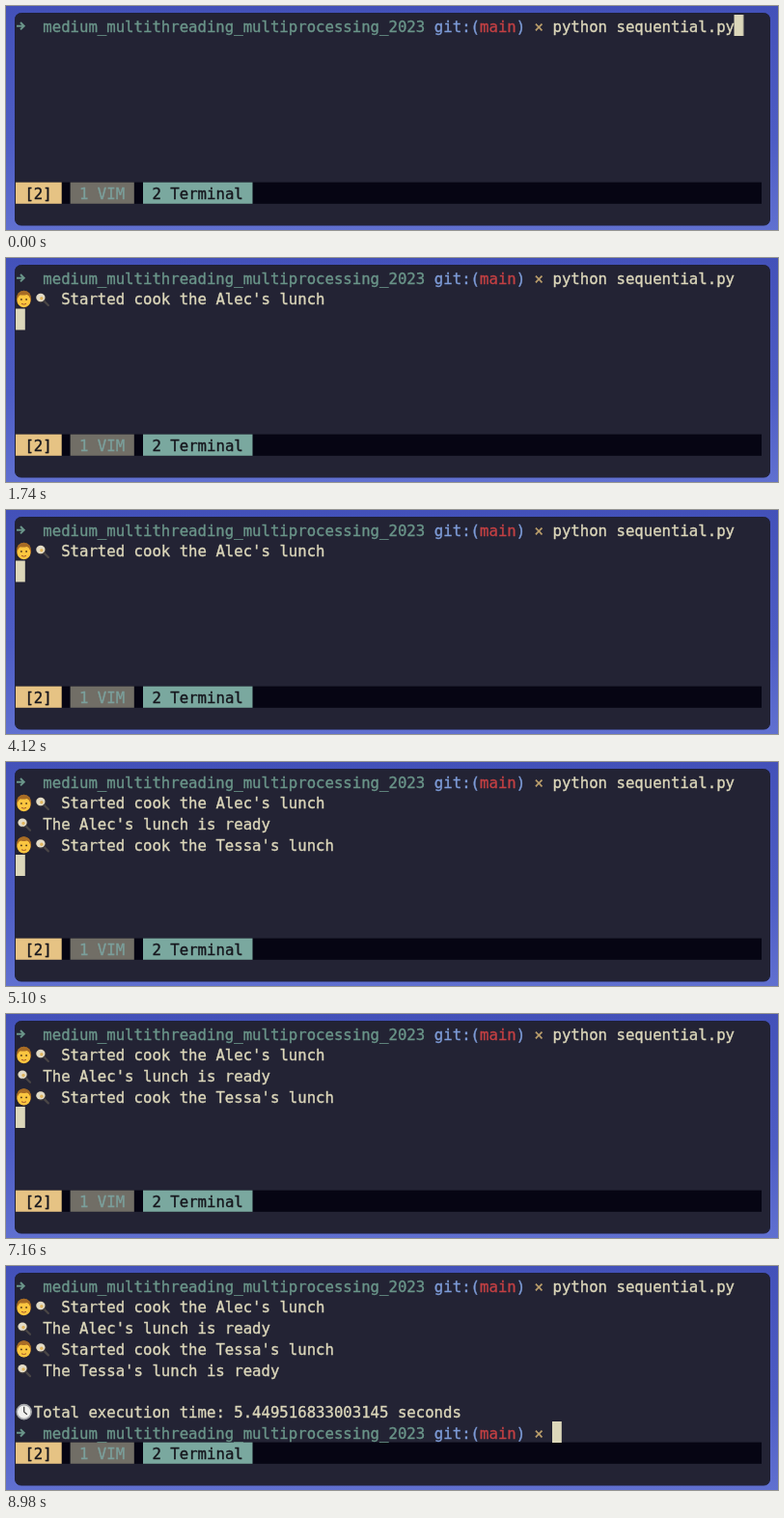
Animation, 800 px wide and 232 px high, one loop 9 s. Source, as an HTML page:

```html
<!DOCTYPE html>
<html lang="en">
<head>
<meta charset="utf-8">
<title>Sequential run in a terminal</title>
<style>
  html, body { margin: 0; width: 100%; height: 100%; overflow: hidden; background: #4553b8; }
  svg { display: block; width: 800px; height: 232px; }
  text {
    font: 15.67px "DejaVu Sans Mono", "Noto Sans Mono", monospace;
    font-variant-ligatures: none;
    white-space: pre;
    color: #dcd7ba;
    fill: currentColor;
    stroke: currentColor;
    stroke-width: .35px;
  }
  .path { color: #6a9589; }
  .git { color: #7e9cd8; }
  .branch { color: #c34043; }
  .dirty { color: #c0a36e; }
  .dark { color: #16161d; }
  .dim { color: #7b9f9b; }

  .stage { animation: 9s step-end infinite; }
  #first { animation-name: first; }
  #second { animation-name: second; }
  #finish { animation-name: finish; }
  #cursor { animation-name: cursor; }

  @keyframes first { 0% { visibility: hidden; } 8.45%, 100% { visibility: visible; } }
  @keyframes second { 0% { visibility: hidden; } 52.9%, 100% { visibility: visible; } }
  @keyframes finish { 0% { visibility: hidden; } 95.2%, 100% { visibility: visible; } }
  @keyframes cursor {
    0% { transform: translate(754.5px, 9px); }
    5.2% { transform: translate(10px, 31px); }
    8.45% { transform: translate(10px, 52.5px); }
    52.9% { transform: translate(10px, 96px); }
    95.2%, 100% { transform: translate(566px, 161px); }
  }
</style>
</head>
<body>
<svg viewBox="0 0 800 232">
  <defs>
    <linearGradient id="sky" x1="0" y1="0" x2="0" y2="1">
      <stop offset="0" stop-color="#4351b9"/>
      <stop offset=".6" stop-color="#4e5dc4"/>
      <stop offset="1" stop-color="#6070d0"/>
    </linearGradient>
    <g id="arrow" fill="none" stroke="#6a9589" stroke-width="2">
      <path d="M1 11.5H8M5 7.8L8.7 11.5L5 15.2"/>
    </g>
    <g id="man">
      <ellipse cx="8.5" cy="11.4" rx="7.6" ry="8.6" fill="#a86c25"/>
      <ellipse cx="8.5" cy="13" rx="6.9" ry="7.2" fill="#fbc640"/>
      <path d="M1.4 12Q.8 3 8.5 2.8Q16.2 3 15.6 12Q14.2 7.6 11.5 7Q8 8 4.6 7.2Q2.6 8.4 1.4 12Z" fill="#a86c25"/>
      <circle cx="5.9" cy="12" r=".9" fill="#4b3218"/>
      <circle cx="11.1" cy="12" r=".9" fill="#4b3218"/>
      <path d="M6 16.4Q8.5 18 11 16.4" fill="none" stroke="#a4552a"/>
    </g>
    <g id="pan">
      <path d="M10 13L15 18" stroke="#4a4646" stroke-width="2.2" stroke-linecap="round"/>
      <circle cx="7.4" cy="10.6" r="5" fill="#3b3739"/>
      <ellipse cx="7" cy="10" rx="4.6" ry="4.2" fill="#e3dcc8"/>
      <circle cx="8" cy="10.8" r="1.7" fill="#dfb45e"/>
    </g>
    <g id="clock">
      <circle cx="8.7" cy="11.5" r="7.5" fill="#f0f0ee" stroke="#a3a5a9" stroke-width="1.6"/>
      <path d="M8.7 6.2V11.5L11.8 14.2" fill="none" stroke="#333" stroke-width="1.2"/>
    </g>
  </defs>

  <rect width="800" height="232" fill="url(#sky)"/>
  <rect x="9.5" y="7.5" width="782" height="219.5" rx="6" fill="#232334" stroke="#1f2038"/>

  <rect x="10" y="182.6" width="773" height="22.2" fill="#060513"/>
  <rect x="10" y="182.6" width="47.7" height="22.2" fill="#e6c384"/>
  <rect x="66.6" y="182.6" width="66.2" height="22.2" fill="#716e66"/>
  <rect x="142" y="182.6" width="113.5" height="22.2" fill="#7aa89f"/>

  <rect id="cursor" class="stage" width="9.8" height="22" fill="#dcd7ba"/>
  <g id="base"></g>
  <g id="first" class="stage"></g>
  <g id="second" class="stage"></g>
  <g id="finish" class="stage"></g>
</svg>
<script>
  const NS = "http://www.w3.org/2000/svg";
  const colX = col => 10 + col * 9.432;
  const rowY = row => 9.2 + row * 21.73;

  function add(group, tag, attrs, label = "") {
    const node = document.createElementNS(NS, tag);
    for (const key in attrs) node.setAttribute(key, attrs[key]);
    node.textContent = label;
    document.getElementById(group).append(node);
  }

  const write = (group, row, col, label, style = "") =>
    add(group, "text", { x: colX(col), y: rowY(row) + 17.4, class: style }, label);

  const icon = (group, row, col, name) =>
    add(group, "use", { href: "#" + name, x: colX(col), y: rowY(row) });

  function prompt(group, row) {
    icon(group, row, 0, "arrow");
    write(group, row, 3, "medium_multithreading_multiprocessing_2023", "path");
    write(group, row, 46, "git:(", "git");
    write(group, row, 51, "main", "branch");
    write(group, row, 55, ")", "git");
    write(group, row, 57, "×", "dirty");
  }

  function started(group, row, name) {
    icon(group, row, 0, "man");
    icon(group, row, 2, "pan");
    write(group, row, 5, `Started cook the ${name}'s lunch`);
  }

  function ready(group, row, name) {
    icon(group, row, 0, "pan");
    write(group, row, 3, `The ${name}'s lunch is ready`);
  }

  prompt("base", 0);
  write("base", 0, 59, "python sequential.py");
  write("base", 8, 1, "[2]", "dark");
  write("base", 8, 7, "1 VIM", "dim");
  write("base", 8, 15, "2 Terminal", "dark");

  started("first", 1, "Alec");
  ready("second", 2, "Alec");
  started("second", 3, "Tessa");
  ready("finish", 4, "Tessa");
  icon("finish", 6, 0, "clock");
  write("finish", 6, 2, "Total execution time: 5.449516833003145 seconds");
  prompt("finish", 7);
</script>
</body>
</html>
```
